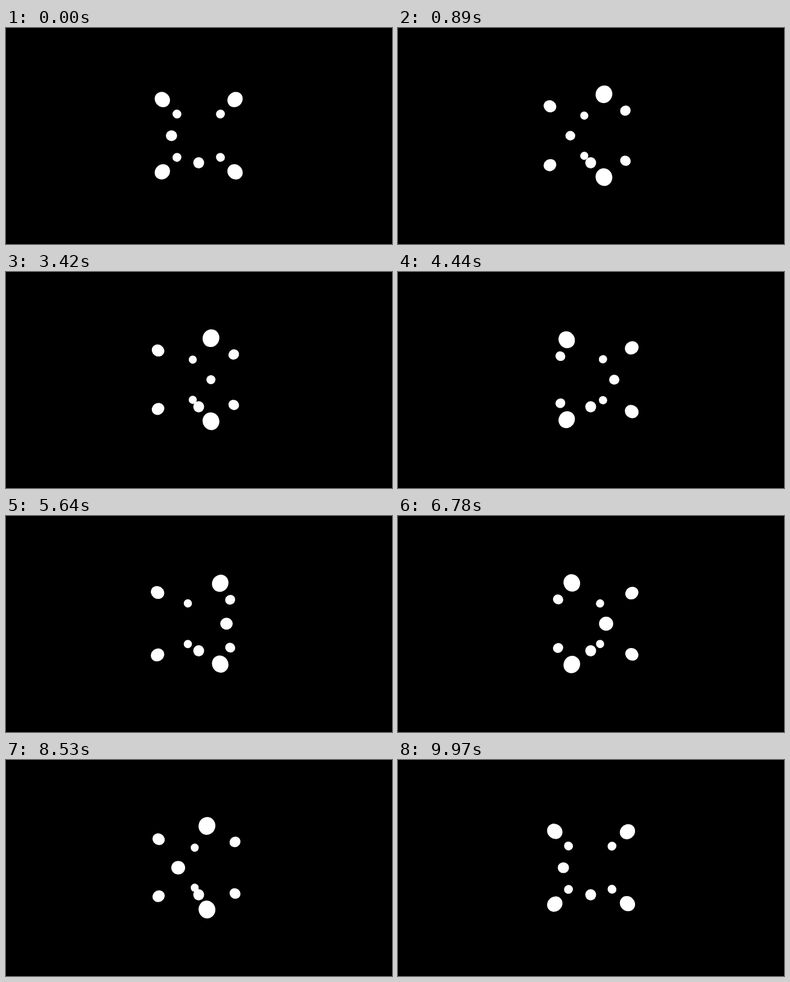
Recreate the animation shown at these times as an HTML page. Size 640x360 px, loop 10000 ms.

```html
<!DOCTYPE html>
<html lang="en">
<head>
<meta charset="utf-8">
<title>Orbiting spheres</title>
<style>
  html, body { margin: 0; width: 100%; height: 100%; overflow: hidden; background: #000; }
  svg { display: block; width: 100%; height: 100%; }
</style>
</head>
<body>
<svg id="stage" viewBox="0 0 640 360" fill="#fff"></svg>
<script>
const LOOP = 10000;
const STEPS = 360;       // one degree per step
const CX = 319.5, CY = 179.5;
const FOCAL = 180;       // 90 degree vertical view
const CAMERA = 4;        // distance from the camera to the centre
const RADIUS = 0.2;
const RAD = Math.PI / 180;

const stage = document.getElementById('stage');

function addSphere() {
  const node = document.createElementNS('http://www.w3.org/2000/svg', 'ellipse');
  return stage.appendChild(node);
}

// Exact perspective outline of a sphere; z points towards the viewer, y down.
function place(node, x, y, z) {
  const depth = CAMERA - z;
  const k = depth * depth - RADIUS * RADIUS;
  const dist2 = x * x + y * y + depth * depth;
  const px = CX + FOCAL * x * depth / k;
  const py = CY + FOCAL * y * depth / k;
  const tilt = Math.atan2(y, x) / RAD;
  node.setAttribute('rx', FOCAL * RADIUS * Math.sqrt(dist2 - RADIUS * RADIUS) / k);
  node.setAttribute('ry', FOCAL * RADIUS / Math.sqrt(k));
  node.setAttribute('transform', `translate(${px} ${py}) rotate(${tilt})`);
}

// Point on a horizontal ring; 0 degrees faces the viewer.
function placeOnRing(node, size, y, degrees) {
  const a = degrees * RAD;
  place(node, size * Math.sin(a), y, size * Math.cos(a));
}

const corners = [];
for (const y of [-1, 1]) {
  for (let start = 45; start < 360; start += 90) {
    corners.push({ node: addSphere(), y, start });
  }
}
const orbiter = addSphere();
place(addSphere(), 0, 1, 0);

function draw(ms) {
  // The clock ticks in whole hundredths of a second.
  const turn = Math.floor((ms % LOOP + 5) * STEPS / LOOP + 1e-6) % STEPS;
  for (const c of corners) placeOnRing(c.node, Math.SQRT2, c.y, c.start - turn);
  placeOnRing(orbiter, 1, 0, -90 - turn);
}

const begin = performance.now();
function tick() {
  draw(performance.now() - begin);
  requestAnimationFrame(tick);
}
draw(0);
requestAnimationFrame(tick);
</script>
</body>
</html>
```
